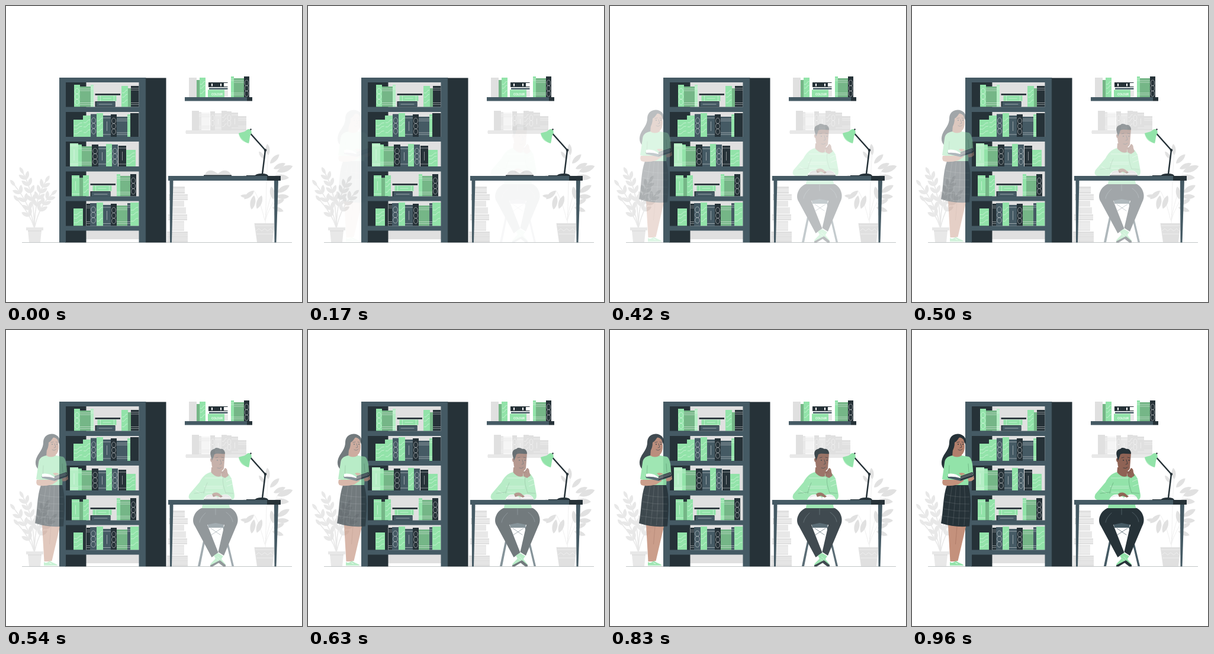
An HTML page for the animation above (1000 ms loop, 500 by 500 pixels).

```html
<!DOCTYPE html>
<html lang="en">
<head>
<meta charset="utf-8">
<title>Library</title>
<style>
html, body { margin: 0; width: 100%; height: 100%; overflow: hidden; background: #fff; }
svg { display: block; width: 100vw; height: 100vh; }
.d { fill: #263238; } .m { fill: #455a64; } .g { fill: #92e3a9; } .k { fill: #75b687; }
.p { fill: #b5eec5; } .e { fill: #e0e0e0; } .f { fill: #e8e8e8; } .n { fill: #f5f5f5; } .w { fill: #fff; }
.her { fill: #c4917c; } .face { fill: #b27f6c; } .his { fill: #8f6355; }
.line { fill: none; stroke: #fff; stroke-width: .6; stroke-opacity: .75; }
.ink { fill: none; stroke: #263238; stroke-width: .7; stroke-linecap: round; }
.fold { fill: none; stroke: #5f9f72; stroke-width: .6; stroke-linecap: round; }
.person { animation: appear 1s step-end infinite; }
@keyframes appear {
  0% { opacity: 0; } 17% { opacity: .04; } 21% { opacity: .07; } 25% { opacity: .11; }
  29% { opacity: .15; } 33% { opacity: .2; } 38% { opacity: .26; } 42% { opacity: .31; }
  46% { opacity: .37; } 50% { opacity: .43; } 54% { opacity: .5; } 58% { opacity: .57; }
  63% { opacity: .65; } 67% { opacity: .7; } 71% { opacity: .75; } 75% { opacity: .8; }
  79% { opacity: .84; } 83% { opacity: .88; } 88% { opacity: .93; } 92% { opacity: .97; }
  96%, 100% { opacity: 1; }
}
</style>
</head>
<body>
<svg viewBox="0 0 500 500">
  <g id="plants"></g>
  <path class="f" d="M34 374H63V379H60L58 399H39L37 379H34Z"/>
  <path class="e" d="M37 379H60L59.8 381H37.2Z"/>
  <path class="e" d="M419.5 367H453.500L450 399H424Z"/>
  <path class="line" d="M421 371H453M422 380l5 -4 5 4 5 -4 5 4 5 -4 4 4M423 385H451"/>
  <g id="pile"></g>
  <path d="M27 399.500H483" stroke="#263238" stroke-width=".5" opacity=".55"/>

  <g id="bookcase">
    <path class="d" d="M236 121.500H270.500V399.500H236Z"/>
    <path class="e" d="M135 128H225V394H135Z"/>
    <path class="d" d="M100 128H135.500V399.500H100Z"/>
    <g id="books"></g>
    <path class="m" fill-rule="evenodd" d="M90 121H236V399.500H224.500V379.500H101V399.500H90ZM101 129V170.500H224.500V129ZM101 179V221H224.500V179ZM101 229V271H224.500V229ZM101 279.500V321.500H224.500V279.500ZM101 329.500V371.500H224.500V329.500Z"/>
    <path d="M236 121V399" stroke="#37474f" stroke-width=".6"/>
  </g>

  <path class="m" d="M302 154H407V160.500H302Z"/>
  <path class="d" d="M407 154H416V160.500H407Z"/>
  <path class="f" d="M304 210H411V216H304Q302.500 213 304 210Z"/>
  <g id="wall"></g>
  <path class="d" d="M342 129H374.500V130H368V136H374.500V137H342Z"/>
  <path class="w" d="M347 131H349V135.500H347ZM362 131H364V135.500H362Z"/>
  <path class="m" d="M343 138.500H374.500V141H343Z"/>
  <path class="g" d="M341 141.500H369V154H341Z"/>
  <path class="f" d="M369 142H375V153H369Z"/>
  <text x="347" y="150.500" class="w" font-family="Roboto, sans-serif" font-weight="500" font-size="5">COLOUR</text>

  <path class="e" d="M336 286C337 279 344 276 351 279L358 283 364 279C371 276 377 278 381 286Z"/>
  <path class="d" d="M334 285.500H381V287.200H334Z"/>

  <g class="person">
    <path class="ink" style="stroke:#455a64" d="M346 335L362 346M364 335L347 346"/>
    <path class="m" d="M340 326H368.500L367 334H342Z"/>
    <path class="m" d="M338 333L341 334 328 399H324Z"/>
    <path class="m" d="M366 333L369 332 385 399H381.500Z"/>
    <path class="d" d="M332 300.500H378C388 303 396 319 389 331L368 381 358.500 375 369 329 354 326 340 329 358.500 376 347.500 384 319 331C311 319 321 303 332 300.500Z"/>
    <path class="ink" style="stroke:#607078" d="M354 302V312M337 309C331 315 328 319 327 325M372 308C379 313 382 318 383 324"/>
    <path class="g" d="M351 381L358 376.500 363 386 371 396Q371 399.500 367 398.500L356 390Z"/>
    <path class="d" d="M355 390L367 399.500H371V397L358 386Z"/>
    <path class="g" d="M359 377L367 382 361 391 349 398.500Q344 400 345.500 395L354 386Z"/>
    <path class="d" d="M345 397.500L361 389 363 391 349 399.500H345Z"/>
    <path class="line" d="M355 386l5 4M357 383l5 4"/>
    <path class="his" d="M347 232H363V248Q354 252 346 246Z"/>
    <path class="g" d="M346 240C336 243 331 249 327 257L310 277C307 283 309 287 315 287H333L331 301H378L376 287H382C386 286 386.500 281 385.500 276L381 251 376 243 364 242 363 247Q354 250 346 240Z"/>
    <path class="line" d="M336 250H366M334 264H366M336 267H366M337 274H350M334 294H377M320 271L329 276M372 256L381 252M373 264L383 260"/>
    <path class="fold" d="M340 258C337 265 335 270 334 276M318 276L334 274M367 248C365 257 368 266 371 275M371 275L384 276"/>
    <path class="his" d="M348 209C346 220 347 232 351 238 357 242 365 240 368 234L370 207 363 203Z"/>
    <path class="his" d="M349 218q-4-4-4 1t4 4Z"/>
    <path class="d" d="M348 221L345.500 211C344 204 349 201 352 201 354 198 359 199 362 201 366 200 370 203 370 209 364 210 357 207 352 210L350 216Z"/>
    <path class="ink" d="M354 216l4-1M364 215l4 1M362 219l2 7 -3 1M357 233q4 2 7-1"/>
    <circle class="d" cx="357" cy="220" r=".9"/><circle class="d" cx="366.500" cy="220" r=".9"/>
    <path class="his" d="M364 247L363 241 358 238Q361 236 366 239L370 233Q374 234 374 240L376 246 370 250Z"/>
    <path class="ink" style="stroke:#653f35;stroke-width:.5" d="M366 239L370 237M364 241L369 241"/>
    <path class="w" d="M333 287.300C336 279 344 276 351 279L358 283 364 279C371 276 379 278 382 287.300Z"/>
    <path class="ink" style="stroke:#b8bec1;stroke-width:.5" d="M338 282q6-4 15-1M363 282q8-4 15 0M358 283V286"/>
    <path class="his" d="M348 277C353 273 359 274 362 278L366 281 363 283 356 280 350 282Z"/>
  </g>

  <g id="desk">
    <path class="m" d="M276.500 295H282.500L280 399.500H277Z"/>
    <path class="m" d="M453 295H460L456.500 399.500H453.500Z"/>
    <path class="m" d="M274 287H441V295H274Z"/>
    <path class="d" d="M441 287H464V295H441Z"/>
  </g>
  <g id="lamp">
    <path d="M433 284L438 243.500 413 215.500" fill="none" stroke="#263238" stroke-width="2.500" stroke-linejoin="round"/>
    <circle class="d" cx="438" cy="243.500" r="2.200"/>
    <path class="d" d="M420 287Q422 283 432 283T443 287ZM406 286H421V287H406Z"/>
    <path class="p" d="M393 214.500L410 232Q402 230 398 226T393 214.500Z"/>
    <path class="g" d="M393 215C398 213 404 213 407 209 411 206 416 210 414.500 215 411 220 412 227 410 232 403 230 395 223 393 215Z"/>
    <circle class="d" cx="413.500" cy="208.500" r="1.300"/>
  </g>

  <g class="person">
    <path class="d" d="M77 175.500C67 176 63 183 63 190 63 200 56 207 52.500 214 48.500 222 49 231 55 235.500 60 229 69 224 73 213L88 192C91 184 87 175 77 175.500Z"/>
    <path class="her" d="M61 329H76L74 391H64.500Z"/>
    <path class="her" d="M74 330H91.500L77.500 390 72 391Z"/>
    <path d="M76 332L73.500 362" stroke="#a87663" stroke-width=".7"/>
    <path class="g" d="M64 392Q69 395 74 390L79 393 86 396Q88 398 86 398.500H64Z"/>
    <path d="M64 398H87M73 393l4 2" stroke="#fff" stroke-width=".8" fill="none"/>
    <path class="face" d="M69 201L84 205 84 214Q76 222 68 214Z"/>
    <path class="g" d="M68 212C59 214 56 217 55 224L51 252 62 254V263H95L96 248 103.500 244C103 231 102 217 96 214L84 212Q76 217 68 212Z"/>
    <path class="fold" d="M63 229L62 251M95 226L96 240M66 255q7 3 14 1"/>
    <path class="face" d="M68.500 190C67 203 70 210 78 212 86 213 89.500 205 89 195L87 181Q77 180 72 187Z"/>
    <path class="d" d="M67 204L65 187C67 178 79 173 87 179 91 182 92 189 90.500 194L87 185Q84 182 80 181 76 188 72 190 72 198 68.500 204Z"/>
    <path class="ink" d="M76 190l4-1M84 189l3 1M82 192l2 6 -3 1M78 202q4 3 7-1"/>
    <circle class="d" cx="78" cy="193" r=".9"/><circle class="d" cx="86" cy="193" r=".9"/>
    <path class="d" d="M59 262H95C101 281 99 308 97 331.500Q73 334 49 326.500C53 307 52 281 59 262Z"/>
    <path id="plaid" class="line" style="stroke-opacity:.22"/>
    <path class="her" d="M52 253L63 253 74 253 83 249Q88 250 87 255L78 261Q62 265 53 262 50 258 52 253Z"/>
    <path class="her" d="M94 249L104 246 105 252Q100 257 95 255Z"/>
    <path class="m" d="M60 247Q72 246 82 250L103 240.500 103 248 82 255 61 250Z"/>
    <path class="w" d="M61 243Q73 241 82 249L81 250Q71 247 61 248Z"/>
    <path class="d" d="M82 247L102 240 103 247 82 254Z"/>
    <path class="line" d="M82 249L102 242M82 251L103 244"/>
    <path class="her" d="M79 242q6-2 11 1l-7 3Z"/>
  </g>
</svg>
<script>
const $ = id => document.getElementById(id);
const path = (cls, d) => `<path class="${cls}" d="${d}"/>`;
const box = (cls, x, y, w, h) => path(cls, `M${x} ${y}h${w}v${h}h${-w}Z`);

// Spine ornaments
const deco = {
  c(x, y, w, h) {
    let s = '';
    for (let cy = y + 11; cy < y + h - 5; cy += 9)
      s += `<ellipse class="line" cx="${x + w / 2}" cy="${cy}" rx="${w * .35}" ry="4.800"/>`;
    return s;
  },
  w(x, y, w, h) {
    let d = '';
    for (const k of [.25, .45, .72]) d += `M${x + 1} ${y + h * k + 3}q${w * .35} 1 ${w * .45} -2t${w * .4} -3`;
    return path('line', d);
  },
  l(x, y, w, h) {
    return path('line', `M${x} ${y + 4}h${w}M${x} ${y + 7}h${w}M${x} ${y + h - 7}h${w}M${x} ${y + h - 4}h${w}`);
  },
  v(x, y, w, h) {
    return path('line', `M${x} ${y + 4}h${w}M${x + w / 2} ${y + 10}v${h - 20}M${x} ${y + h - 4}h${w}`);
  }
};

// Each book: x, width, top, colour class plus optional ornament
function row(base, list) {
  return list.split(',').map(item => {
    const [x, w, y, kind] = item.trim().split(' ');
    const a = [+x, +y, +w, base - y];
    return box(kind[0], ...a) + (kind[1] ? deco[kind[1]](...a) : '');
  }).join('');
}

function stack(x, y) {
  return box('d', x, y, 42.5, 2.8) + box('g', x + 4, y + 3.5, 32, 9) + box('d', x, y + 13, 34, 9.5) +
    box('m', x + 2, y + 14, 32, 7.500) +
    path('line', `M${x + 9} ${y + 3.5}v9M${x + 32} ${y + 3.5}v9M${x + 13} ${y + 8}h14M${x + 6} ${y + 18}h23`);
}

$('books').innerHTML =
  row(170.5, '115 10 133 gc, 125 18 136 kl, 143 5 133 pl, 195 11 135 gw, 206 5 139 k, 211 13.5 135 dl') + stack(150.5, 148) +
  row(221, '114 16 192 gw, 130 13 185 gw, 143 10 182.5 mc, 153 11 181 gw, 164 13 185 mv, 177 10 183 dc, 187 18 187 ml, 205 5 183 gl, 210 14.5 181 d') +
  row(271, '108 14 232 pv, 122 6 234 gl, 128 17 237 kl, 145 11 234 dc, 156 13 237 mv, 169 10 233 gw, 179 10 234 mc, 190 13 236 dv, 203 16 243 gw') +
  row(321.5, '111 13 286 gv, 124 6 290 k, 130 10 286 gw, 187 6 284 gl, 193 17 287 kl, 210 10 284 dc') + stack(142.5, 300) +
  row(371.5, '114 16 342 gw, 136 6 334 dl, 142 11 333 mc, 153 11 332 gw, 164 13 336 mv, 177 10 334 dc, 187 18 337 kl, 205 5 333 ml, 210 14.5 332 gw');

$('wall').innerHTML =
  row(154, '309 13 121 e, 322 5 125 k, 327 10 121 gw, 380 5 119 gl, 385 17 122 kl, 402 9 119 dc') +
  row(210, '314 12 177 e, 326 4 179 fl, 330 14 180 nl, 345 8 178 ec, 353 11 181 fv, 364 9 177 ew, 373 8 178 ec, 381 11 180 ev, 392 14 186 el') +
  path('ink" style="stroke:#e0e0e0', 'M330 184h14M330 187h14M330 203h14M330 206h14');

$('pile').innerHTML =
  row(317, '281 21 305 el') + row(328, '275 32 318 el') + row(339, '278 23 329 f') + row(351, '276 28 340 f') +
  row(362, '274 32 352 el') + row(380, '279 22 363 fl') + row(399, '272 35 381 el');

// Plants
const leaf = (x, y, angle, len, wide = .28) =>
  `<path class="f" transform="translate(${x} ${y}) rotate(${angle})" d="M0 0C${len * .25} ${-len * wide} ${len * .75} ${-len * wide} ${len} 0C${len * .75} ${len * wide} ${len * .25} ${len * wide} 0 0Z"/>`;

function branch(cx, cy, tx, ty, pairs) {
  let s = `<path d="M48 375Q${cx} ${cy} ${tx} ${ty}" fill="none" stroke="#e8e8e8" stroke-width="1.6"/>`;
  for (let i = 0; i <= pairs; i++) {
    const t = .4 + .56 * i / pairs, u = 1 - t;
    const x = u * u * 48 + 2 * u * t * cx + t * t * tx;
    const y = u * u * 375 + 2 * u * t * cy + t * t * ty;
    const a = Math.atan2(u * (cy - 375) + t * (ty - cy), u * (cx - 48) + t * (tx - cx)) * 180 / Math.PI;
    s += i < pairs ? leaf(x, y, a - 35, 15) + leaf(x, y, a + 35, 15) : leaf(x, y, a, 13);
  }
  return s;
}

const big = [
  [443, 252, -95, 19], [436, 258, -125, 15], [446, 266, -45, 22], [452, 275, -25, 22],
  [458, 280, -20, 28], [452, 288, 5, 26], [458, 315, -30, 24], [456, 322, 0, 22],
  [452, 335, -25, 20], [450, 340, 20, 20], [417, 290, 178, 24], [419, 312, 140, 22],
  [413, 322, 185, 17], [419, 320, 100, 24], [432, 320, 110, 24], [448, 305, 80, 22]
];
$('plants').innerHTML =
  branch(47, 312, 28, 281, 4) + branch(42, 336, 13, 301, 3) + branch(48, 325, 68, 295, 4) +
  branch(57, 335, 78, 318, 3) + branch(40, 350, 20, 328, 1) +
  path('ink" style="stroke:#e8e8e8', 'M438 367C440 330 439 290 443 250M438 360C444 325 456 300 458 280M437 362C432 340 425 320 419 312M438 362C443 345 450 335 456 322') +
  `<g style="filter:brightness(.97)">${big.map(b => leaf(...b, .24)).join('')}</g>`;

// Skirt checks
let d = '';
for (let i = 1; i < 5; i++) d += `M${61 + i * 6.800} 263Q${53 + i * 9.500} 295 ${50 + i * 9.500} ${328 + i * .6}`;
for (let i = 1; i < 5; i++) d += `M${58 - i * 1.600} ${266 + i * 12}Q75 ${271 + i * 12} 97 ${270 + i * 12}`;
$('plaid').setAttribute('d', d);
</script>
</body>
</html>
```
